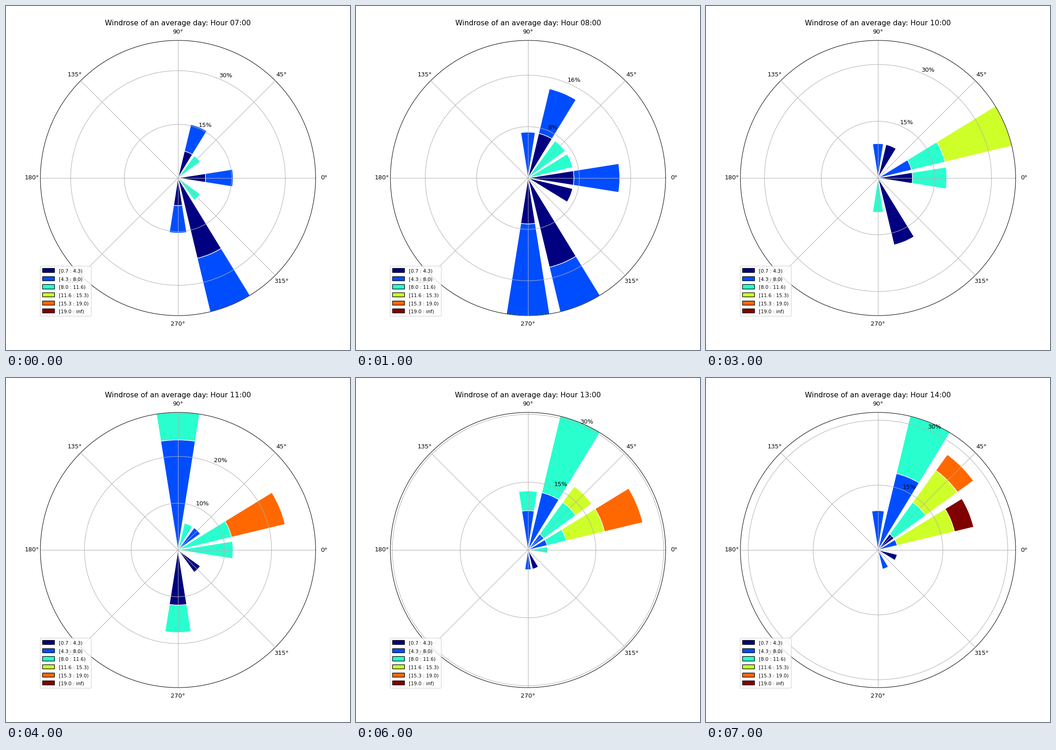
A matplotlib script that plays this animation: 748x748 px, repeating every 8000 ms.

```python
import numpy as np
import matplotlib.pyplot as plt
from itertools import groupby
from matplotlib.animation import FuncAnimation
from matplotlib.patches import Rectangle

plt.rcParams["font.family"] = "DejaVu Sans"

# One column per direction from 90 to -90 degrees, one letter per observation,
# the letter being the speed class: navy, blue, cyan, yellow, orange, red.
HOURS = {
    7: "- nb c - nb - c nnnbb nb",
    8: "b nb c c nb n - nnb nbb",
    9: "bb - nc y bc n - nnc bbc",
    10: "b n - bcyy nc - - nn c",
    11: "bbbbc c b ccoo cc - n - nnc",
    12: "bbc bbccc bc ncyyoo c - - n b",
    13: "bbc bbbcccc bccy bcyyoo c - - n b",
    14: "bb bbbbccc nccyyo byyyr - n - b -",
}
CLASSES = "nbcyor"
LABELS = ["[0.7 : 4.3)", "[4.3 : 8.0)", "[8.0 : 11.6)",
          "[11.6 : 15.3)", "[15.3 : 19.0)", "[19.0 : inf)"]
COLORS = plt.get_cmap("jet")(np.linspace(0, 1, len(CLASSES)))
ANGLES = np.radians(np.linspace(90, -90, 9))
WIDTH = 0.8 * 2 * np.pi / 16
STEPS = (1, 1.5, 2, 2.5, 3, 4, 5, 6, 8, 10, 15, 20)

fig = plt.figure(figsize=(8, 8), dpi=93.5, facecolor="white")
ax = fig.add_axes([0.1, 0.1, 0.8, 0.8], projection="polar")
ax.set_axisbelow(False)

keys = [Rectangle((0, 0), 0.2, 0.2, facecolor=c, edgecolor="black") for c in COLORS]
legend = ax.legend(keys, LABELS, loc="lower left", borderaxespad=-0.1)
plt.setp(legend.get_texts(), fontsize=8)

bars = []


def draw_spoke(angle, speeds, unit):
    base = 0
    for letter, group in groupby(speeds):
        height = len(list(group)) * unit
        k = CLASSES.index(letter)
        bars.extend(ax.bar(angle, height, WIDTH, base, color=COLORS[k],
                           edgecolor="white", linewidth=1, zorder=2 - k / 10))
        base += height


def draw(i):
    while bars:
        bars.pop().remove()
    hour = list(HOURS)[i]
    spokes = [s.strip("-") for s in HOURS[hour].split()]
    unit = 100 / sum(map(len, spokes))
    for angle, speeds in zip(ANGLES, spokes):
        draw_spoke(angle, speeds, unit)

    top = unit * max(map(len, spokes))
    step = next(s for s in STEPS if s >= top / 3)
    rings = np.arange(step, top, step)
    ax.set_rgrids(rings, [f"{r:g}%" for r in rings], angle=67.5)
    ax.set_ylim(0, top)
    ax.set_title(f"Windrose of an average day: Hour {hour:02d}:00")
    return bars


anim = FuncAnimation(fig, draw, frames=len(HOURS), interval=1000,
                     repeat=True, repeat_delay=0, blit=False)
plt.show()
```
